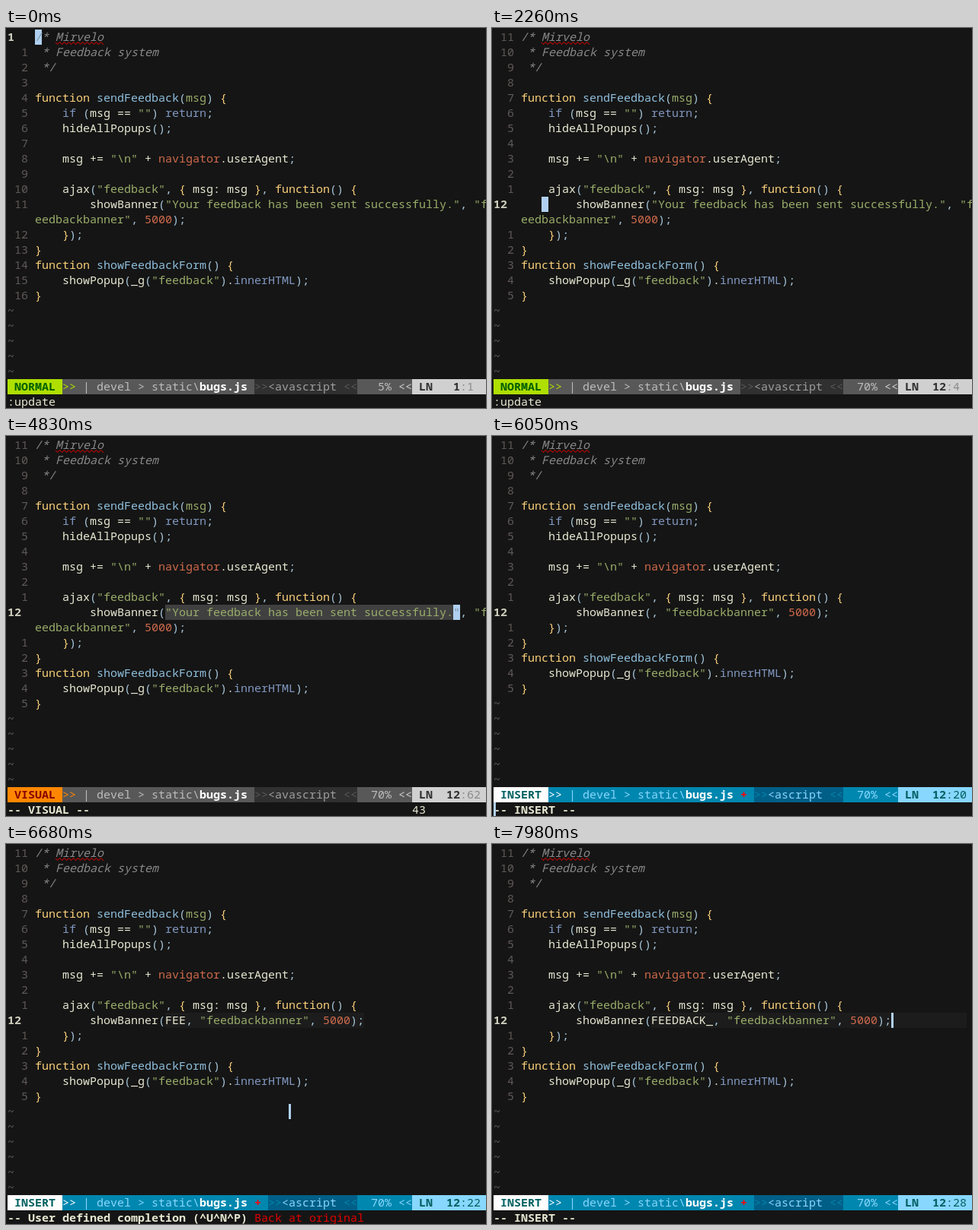
These frames come from a looping animation (630 by 500 pixels, 8000 ms). An HTML page with a canvas:

```html
<!DOCTYPE html>
<html lang="en">
<head>
<meta charset="utf-8">
<title>Editing bugs.js</title>
<style>
  html, body { margin: 0; width: 100%; height: 100%; overflow: hidden; background: #151515; }
  canvas { display: block; }
</style>
</head>
<body>
<canvas id="screen" width="630" height="500"></canvas>
<script>
const ctx = document.getElementById('screen').getContext('2d');
const CELL = 9, ROW = 20, PAD = 2, COLS = 70, GUTTER = 4, LOOP = 8000;
const BG = '#151515', FG = '#e8e8d3', GREEN = '#99ad6a', CURSOR = '#b0d0f0';
const STATUS_ROW = 23, CMD_ROW = 24, EDIT_ROW = 11, ARG_COL = 23;
const MESSAGE = '"Your feedback has been sent successfully."';
const TAIL = ', "feedbackbanner", 5000);';

const code = arg => [
  '/* Mirvelo',
  ' * Feedback system',
  ' */',
  '',
  'function sendFeedback(msg) {',
  '    if (msg == "") return;',
  '    hideAllPopups();',
  '',
  '    msg += "\\n" + navigator.userAgent;',
  '',
  '    ajax("feedback", { msg: msg }, function() {',
  '        showBanner(' + arg + TAIL,
  '    });',
  '}',
  'function showFeedbackForm() {',
  '    showPopup(_g("feedback").innerHTML);',
  '}'
];

const syntax = [
  [/"[^"]*"/y, GREEN],
  [/function\b/y, '#fad07a'],
  [/(?<=function )\w+/y, '#8fbfdc'],
  [/(?<=sendFeedback\()msg/y, GREEN],
  [/(if|return|innerHTML)\b/y, '#8197bf'],
  [/navigator\b|\d+/y, '#cf6a4c'],
  [/[{}]/y, '#fad07a'],
  [/[();,]/y, '#a5c5d8'],
  [/\w+|./y, FG]
];

const normal = {
  name: 'NORMAL', bg: '#afdf00', fg: '#005f00', arrow: '#afdf00',
  bar: '#585858', text: '#bcbcbc', mid: '#303030', type: '#9e9e9e',
  end: '#d0d0d0', ln: '#303030', pos: '#8a8a8a', fileType: '<avascript'
};
const visual = { ...normal, name: 'VISUAL', bg: '#ff8700', fg: '#870000', arrow: '#ff8700' };
const insert = {
  name: 'INSERT', bg: '#ffffff', fg: '#005f5f', arrow: '#ffffff',
  bar: '#0087af', text: '#87d7ff', mid: '#005f87', type: '#87d7ff',
  end: '#87d7ff', ln: '#005f5f', pos: '#005f5f', fileType: '<ascript'
};

const off = { on: false }, on = { on: true };
const lineEnd = arg => ARG_COL + arg.length + TAIL.length;
// Typed text first appears with the cursor still at the end of the line.
const drawn = arg => ({ arg, cursor: [lineEnd(arg), EDIT_ROW], glow: lineEnd(arg) });
const settled = arg => ({
  arg, cursor: [ARG_COL + arg.length, EDIT_ROW], pos: 20 + arg.length,
  cmd: '-- INSERT --', note: ''
});

const events = [
  [0, { line: 1, pos: 1, percent: 5, mode: normal, arg: MESSAGE, cmd: ':update', note: '',
        show: '', cursor: [4, 0], on: true, select: 0, glow: ARG_COL }],
  [260, off], [490, on], [880, off], [1140, on], [1540, off], [1800, on],
  [2000, { show: '1' }],
  [2160, { show: '11' }],
  [2260, { show: '', line: 12, pos: 4, percent: 70, cursor: [7, EDIT_ROW] }],
  [2900, off], [3160, on],
  [3520, { show: 'f' }],
  [3750, { show: '', pos: 20, cursor: [ARG_COL, EDIT_ROW] }],
  [4010, { mode: visual, cmd: '-- VISUAL --', show: '1', select: 1 }],
  [4600, { show: 'f' }],
  [4830, { show: '43', pos: 62, cursor: [65, EDIT_ROW], select: 43 }],
  [5530, off], [5790, on],
  [6050, { mode: insert, cmd: '-- INSERT --', show: '', pos: 20, arg: '', select: 0, cursor: [0, CMD_ROW] }],
  [6080, settled('')],
  [6370, drawn('F')], [6400, settled('F')],
  [6500, drawn('FE')], [6530, settled('FE')],
  [6680, { ...drawn('FEE'), cursor: [41, 17], cmd: '-- User defined completion (^U^N^P)',
           note: 'Back at original' }],
  [6760, settled('FEE')],
  [6840, drawn('FEED')], [6870, settled('FEED')],
  [6940, settled('FEEDB')],
  [7030, settled('FEEDBA')],
  [7120, drawn('FEEDBAC')], [7150, settled('FEEDBAC')],
  [7490, { ...drawn('FEEDBACK'), glow: 69 }],
  [7550, settled('FEEDBACK')],
  [7980, { ...drawn('FEEDBACK_'), glow: 69 }]
];

const stateAt = t => Object.assign({}, ...events.filter(e => e[0] <= t).map(e => e[1]));
const X = col => PAD + col * CELL;
const Y = row => PAD + row * ROW;

function box(col, row, cols, color) {
  ctx.fillStyle = color;
  ctx.fillRect(X(col), Y(row), cols * CELL, ROW);
}

function put(col, row, text, color, style = '') {
  ctx.font = `${style} 15px "Noto Sans Mono", "DejaVu Sans Mono", monospace`;
  ctx.fillStyle = color;
  [...text].forEach((ch, i) => ch !== ' ' && ctx.fillText(ch, X(col + i), Y(row) + 15));
}

function colorize(line) {
  const colors = [];
  while (colors.length < line.length) {
    const at = colors.length;
    for (const [re, color] of syntax) {
      re.lastIndex = at;
      const m = re.exec(line);
      if (!m) continue;
      for (const _ of m[0]) colors.push(color);
      break;
    }
  }
  return colors;
}

function spellMark() {
  ctx.strokeStyle = '#e00000';
  ctx.lineWidth = 1;
  ctx.beginPath();
  for (let x = X(7); x <= X(14); x++) ctx.lineTo(x, 20 + 1.5 * Math.sin(x * Math.PI / 3));
  ctx.stroke();
}

function drawCode(s) {
  const width = COLS - GUTTER;
  let row = 0;
  code(s.arg).forEach((line, i) => {
    const number = i + 1;
    if (number === s.line) put(0, row, String(number), '#d0d0c0', 'bold');
    else put(0, row, String(Math.abs(number - s.line)).padStart(3), '#605958');
    const comment = i < 3;
    const colors = comment ? [] : colorize(line);
    [...line].forEach((ch, k) =>
      put(GUTTER + k % width, row + Math.floor(k / width), ch,
          comment ? '#888888' : colors[k], comment ? 'italic' : ''));
    row += Math.max(1, Math.ceil(line.length / width));
  });
  for (; row < STATUS_ROW; row++) put(0, row, '~', '#606060');
  spellMark();
}

function drawStatus(s) {
  const m = s.mode, r = STATUS_ROW;
  const changed = m === insert;
  const barEnd = changed ? 38 : 36;
  box(0, r, 8, m.bg);
  box(8, r, barEnd - 8, m.bar);
  box(barEnd, r, 51 - barEnd, m.mid);
  box(51, r, 8, m.bar);
  box(59, r, 11, m.end);

  put(1, r, m.name, m.fg, 'bold');
  put(8, r, '>>', m.arrow);
  put(11, r, '| devel > static\\', m.text);
  put(28, r, 'bugs.js', '#ffffff', 'bold');
  if (changed) put(36, r, '+', '#ff0000', 'bold');
  put(barEnd, r, '>>', m.bar);
  put(barEnd + 2, r, m.fileType, m.type);
  put(49, r, '<<', m.bar);
  put(52, r, `${s.percent}%`.padStart(4), m.text);
  put(57, r, '<<', m.end);
  put(60, r, 'LN', m.ln, 'bold');
  put(64, r, String(s.line).padStart(2), m.ln, 'bold');
  put(66, r, `:${s.pos}`, m.pos);
}

function drawCursor(s) {
  const [col, row] = s.cursor;
  if (s.mode === insert) {
    ctx.fillStyle = CURSOR;
    ctx.fillRect(X(col), Y(row), 3, ROW);
    return;
  }
  box(col, row, 1, CURSOR);
  const under = code(s.arg)[row][col - GUTTER];
  put(col, row, under, '#7d95a5', row ? '' : 'italic');
}

function draw(t) {
  const s = stateAt(t);
  ctx.fillStyle = BG;
  ctx.fillRect(0, 0, 630, 500);
  box(ARG_COL, EDIT_ROW, s.glow - ARG_COL, '#1c1c1c');
  box(ARG_COL, EDIT_ROW, s.select, '#404040');
  drawCode(s);
  drawStatus(s);
  put(0, CMD_ROW, s.cmd, FG, s.cmd[0] === ':' ? '' : 'bold');
  put(36, CMD_ROW, s.note, '#e00000');
  put(59, CMD_ROW, s.show, FG);
  if (s.on) drawCursor(s);
}

const start = performance.now();
function tick() {
  draw((performance.now() - start) % LOOP);
  requestAnimationFrame(tick);
}
tick();
</script>
</body>
</html>
```
